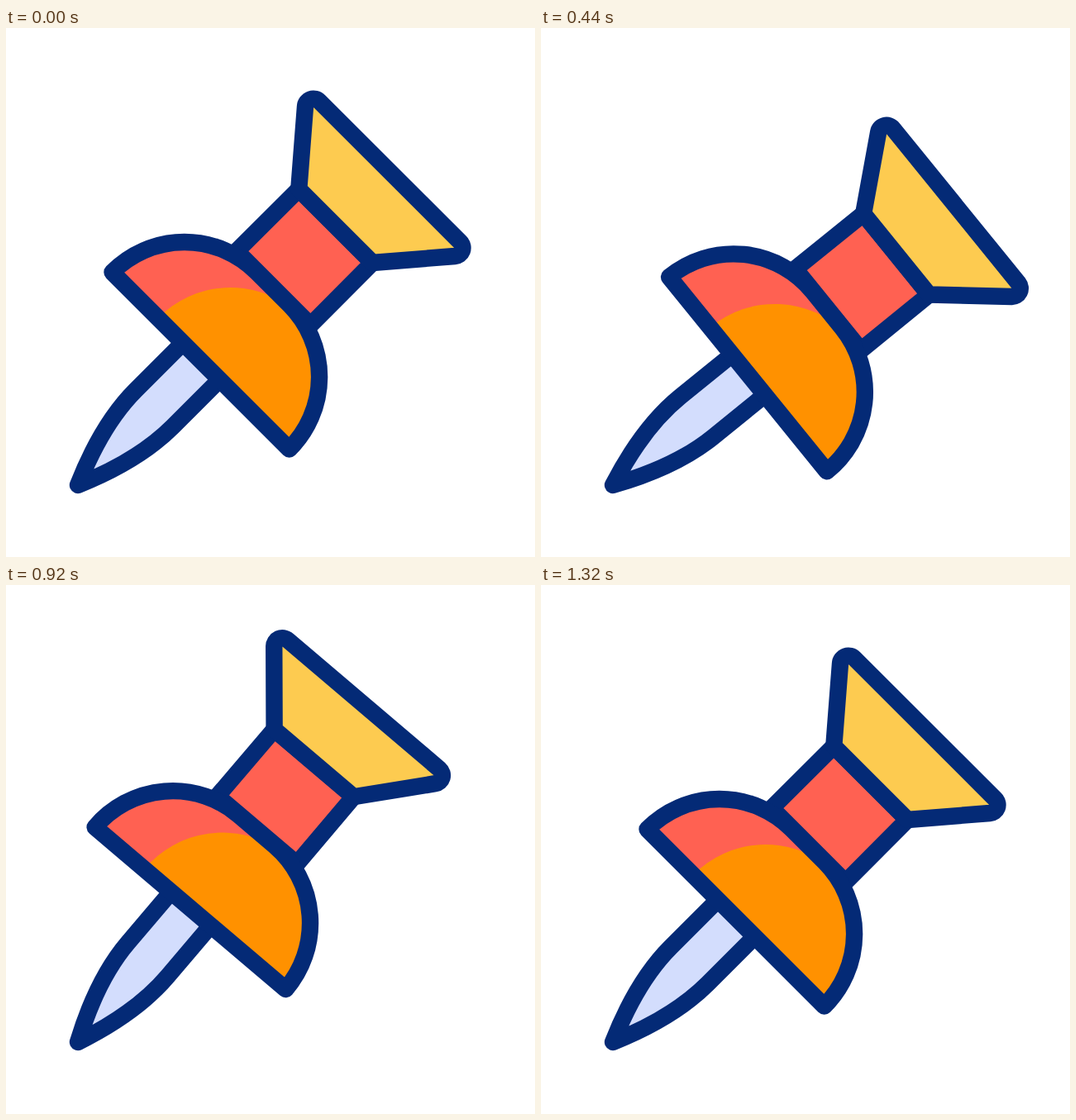
An HTML page that plays this animation: 640 by 640 pixels, repeating every 2 s.

```html
<!DOCTYPE html>
<html lang="en">
<head>
<meta charset="utf-8">
<title>Push pin</title>
<style>
  html, body { margin: 0; height: 100%; overflow: hidden; background: #fff; }
  svg { display: block; width: 100%; height: 100%; }
  #pin { stroke: #042a76; stroke-width: 20.4; stroke-linejoin: round; stroke-linecap: round; }
</style>
</head>
<body>
<svg viewBox="0 0 640 640">
  <g id="pin">
    <path fill="#d3ddfd" d="M216 379L157 438Q116 479 87 553Q160.5 523.5 201.5 482.5L260.5 423.5"/>
    <path fill="#ff6152" d="M354.3 195L279 270L368.4 359.4L443.4 284Z"/>
    <path fill="#fdcb50" d="M354.3 195L362 95A10 10 0 0 1 379.2 88.7L549.6 259A10 10 0 0 1 543.2 276L443.4 284Z"/>
    <path fill="#ff6152" stroke="none" d="M128.5 295.5A123.1 123.1 0 0 1 303 295L343.4 335.4A123.1 123.1 0 0 1 342.7 509.5Z"/>
    <path fill="#ff9100" stroke="none" d="M184 351A123.1 123.1 0 0 1 349.4 341.4A123.1 123.1 0 0 1 342.7 509.5Z"/>
    <path fill="none" d="M128.5 295.5A123.1 123.1 0 0 1 303 295L343.4 335.4A123.1 123.1 0 0 1 342.7 509.5Z"/>
  </g>
</svg>
<script>
const LOOP = 2000, STEP = 40;
const pin = document.getElementById('pin');

// [time in ms, value]
const pull = [[0, 0], [280, 71.7], [360, 0]];
const tilt = [[360, 0], [560, 18], [800, -16.1], [1040, 6.87], [1320, 0]];

// cubic-bezier(.42, 0, .58, 1), solved with Newton's method
function ease(x) {
  let s = x;
  for (let i = 0; i < 5; i++) {
    s -= (((.52 * s - .78) * s + 1.26) * s - x) / ((1.56 * s - 1.56) * s + 1.26);
  }
  return s * s * (3 - 2 * s);
}

function valueAt(keys, time) {
  const next = keys.findIndex(([t]) => t > time);
  if (next < 0) return keys[keys.length - 1][1];
  if (next === 0) return keys[0][1];
  const [t0, v0] = keys[next - 1], [t1, v1] = keys[next];
  return v0 + (v1 - v0) * ease((time - t0) / (t1 - t0));
}

function draw(now) {
  // 25 poses per second; the small bias absorbs timer jitter
  const time = Math.floor((now + 6) / STEP) * STEP % LOOP;
  const shift = valueAt(pull, time);
  pin.setAttribute('transform',
    `translate(${shift} ${-shift}) rotate(${valueAt(tilt, time)} 87 553)`);
  requestAnimationFrame(draw);
}
draw(0);
</script>
</body>
</html>
```
